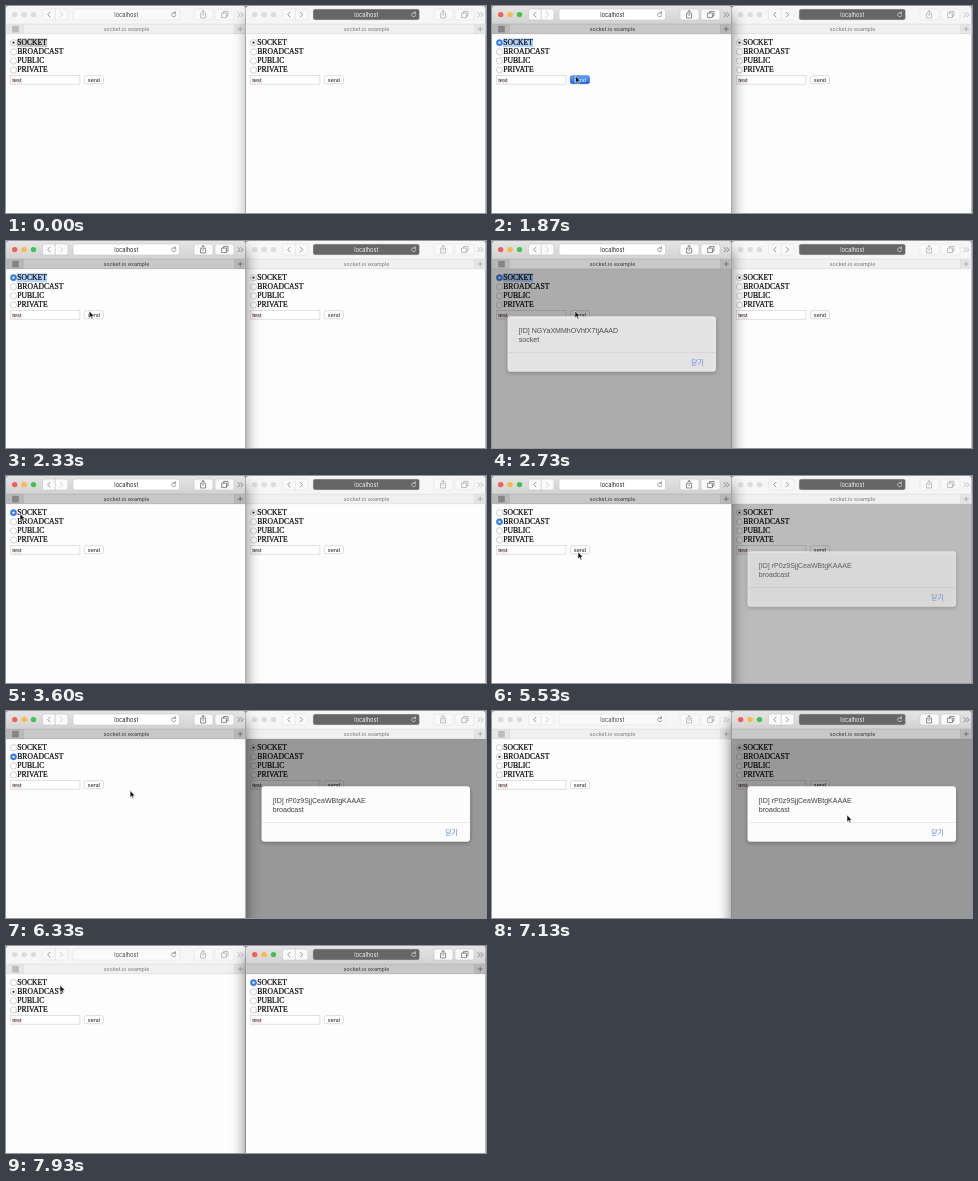
An HTML page for the animation above (8 s loop, 480 by 207 pixels).

```html
<!DOCTYPE html>
<html lang="en">
<head>
<meta charset="utf-8">
<title>socket.io example</title>
<style>
html, body { margin: 0; width: 100%; height: 100%; overflow: hidden; background: #fdfdfe; }
svg { display: block; width: 100%; height: 100%; }
text { white-space: pre; }
.ui { font-family: Inter, "Liberation Sans", sans-serif; }
.form { font-family: "Liberation Sans", Arial, sans-serif; }
.label { font: 7.65px "Liberation Serif", Times, serif; stroke: #000; stroke-width: .18; }
.korean { font: 6.8px "Noto Sans CJK KR", "Noto Sans CJK", sans-serif; fill: #4a7fe5; }
.line { fill: none; stroke-linecap: round; stroke-linejoin: round; stroke-width: .65; }
</style>
</head>
<body>
<svg id="stage" viewBox="0 0 480 207" preserveAspectRatio="none">
  <defs>
    <linearGradient id="bar" x2="0" y2="1">
      <stop stop-color="#e6e5e6"/><stop offset="1" stop-color="#d3d2d3"/>
    </linearGradient>
    <linearGradient id="press" x2="0" y2="1">
      <stop stop-color="#67a5f6"/><stop offset="1" stop-color="#1764e8"/>
    </linearGradient>
    <filter id="soft" x="-10%" y="-20%" width="120%" height="150%"><feGaussianBlur stdDeviation="2.2"/></filter>
    <filter id="wide" x="-12%" y="-12%" width="124%" height="124%"><feGaussianBlur stdDeviation="7.5"/></filter>
  </defs>
</svg>
<script>
const LOOP = 8000;
const OPTIONS = ["SOCKET", "BROADCAST", "PUBLIC", "PRIVATE"];
const LIGHTS = ["#f25f58", "#f5bb45", "#42c250"];
const stage = document.getElementById("stage");

// Cursor way points: time, x, y
const PATH = [
  [70, 345, 209], [870, 286, 172], [1000, 278, 160], [1450, 118, 92],
  [1720, 83.5, 70], [2800, 83, 70], [3180, 204, 120], [3330, 204, 120],
  [3580, 14, 37.5], [3720, 14, 37.5], [4050, 8.5, 44.5], [4450, 8.5, 44.5],
  [5050, 86, 76], [6200, 86, 76], [6750, 352, 101], [7000, 355, 104],
  [7140, 355, 104], [7400, 445, 120], [7530, 445, 120], [7870, 95, 52],
  [7930, 54, 39.3]
];

const clamp = v => Math.max(0, Math.min(1, v));
const ease = v => v * v * (3 - 2 * v);
const during = (t, a, b) => t >= a && t < b;
const fade = (t, a, b, c, d) => Math.min(clamp((t - a) / (b - a)), 1 - clamp((t - c) / (d - c)));

function rect(x, y, w, h, fill, extra = "") {
  return `<rect x="${x}" y="${y}" width="${w}" height="${h}" fill="${fill}" ${extra}/>`;
}

function label(x, y, size, str, extra = "") {
  return `<text x="${x}" y="${y}" font-size="${size}" ${extra}>${str}</text>`;
}

function toolbar(active, isPrivate) {
  const ink = active ? "#565656" : "#a0a0a0";
  const edge = active ? "#bebebe" : "#dedede";
  const button = active ? "#fafafa" : "#f9f9f9";
  const field = isPrivate ? "#666" : active ? "#fff" : "#fafafa";
  const fieldInk = isPrivate ? "#f4f4f4" : active ? "#222" : "#444";
  const box = (x, w, fill) => rect(x, 3, w, 11, fill, `rx="2" stroke="${edge}" stroke-width=".5"`);
  const lights = LIGHTS.map((c, i) =>
    `<circle cx="${8.7 + i * 9.4}" cy="8.6" r="2.7" fill="${active ? c : "#dcdcdc"}"/>`).join("");
  return `<path d="M0 18V3Q0 0 3 0H236.5Q239.5 0 239.5 3V18Z" fill="${active ? "url(#bar)" : "#f6f6f6"}"/>
    ${lights}${box(36.5, 25.5, button)}${box(67, 106.5, field)}${box(188, 19, button)}${box(209, 19, button)}
    <g class="line" stroke="${ink}">
      <path d="M49.2 3V14" stroke="${edge}"/>
      <path d="M44 6.2L41.7 8.6L44 11" stroke="#666"/>
      <path d="M54.3 6.2L56.6 8.6L54.3 11" stroke="${isPrivate ? "#666" : "#bbb"}"/>
      <path d="M195.7 7.4H194.6V12H199.6V7.4H198.5M197.1 9.6V4.6M195.5 6.1L197.1 4.5L198.7 6.1"/>
      <path d="M216 7H220.4V11.6H216ZM217.6 7V5.4H222V10H220.4"/>
      <path d="M232 6.6L234 8.7L232 10.8M235 6.6L237 8.7L235 10.8"/>
      <path d="M169.2 7.1A2.1 2.1 0 1 0 169.8 9M169.5 5.6V7.4H167.8" stroke="${isPrivate ? "#ddd" : "#777"}"/>
    </g>
    ${label(120.3, 10.7, 5.6, "localhost", `class="ui" text-anchor="middle" fill="${fieldInk}"`)}`;
}

function tabs(active, isPrivate) {
  const side = active ? "#b9b8b9" : "#e6e6e6";
  const edge = active ? "#a6a5a6" : "#d4d4d4";
  const pinned = isPrivate ? "" : rect(0, 18, 17, 10, side) +
    rect(6.2, 19.8, 6.6, 6.6, active ? "#858585" : "#bcbcbc") + rect(17, 18, .5, 10, edge);
  return rect(0, 18, 239.5, 10, active ? "#c9c8c9" : "#f0f0f0") + pinned +
    rect(228.5, 18, 11, 10, side) + rect(228.2, 18, .5, 10, edge) +
    rect(0, 17.8, 239.5, .5, edge) + rect(0, 27.6, 239.5, .5, edge) +
    label(120.5, 25, 5.35, "socket.io example", `class="ui" text-anchor="middle" fill="${active ? "#333" : "#777"}"`) +
    `<path class="line" d="M232 23H236.4M234.2 20.8V25.2" stroke="${active ? "#555" : "#999"}"/>`;
}

function radio(i, chosen, active) {
  const blue = chosen && active;
  const y = 36.7 + i * 9.1;
  const dot = chosen ? `<circle cx="7.5" cy="${y}" r="1.15" fill="${blue ? "#fff" : "#333"}"/>` : "";
  return `<circle cx="7.5" cy="${y}" r="3.1" fill="${blue ? "#3480f3" : "#fff"}" stroke="${blue ? "#2a6cd8" : "#a5a5a5"}" stroke-width=".5"/>${dot}` +
    label(11.2, y + 2.3, 7.65, OPTIONS[i], 'class="label"');
}

function page(w) {
  const mark = w.mark ? rect(11, 32.3, 30, 8.8, w.mark) : "";
  const down = w.pressed;
  return rect(0, 28, 239.5, 179, "#fdfdfe") + mark +
    OPTIONS.map((_, i) => radio(i, i === w.choice, w.radioOn)).join("") +
    rect(4.3, 69.4, 69.6, 8.8, "#fff", 'stroke="#cdcdcd" stroke-width=".6"') +
    label(6.2, 75.9, 5.9, "test", 'class="form" fill="#2b1414"') +
    '<path d="M6.2 77H16" stroke="#e0584f" stroke-width=".6" stroke-dasharray="1 .6" opacity=".6"/>' +
    rect(78.3, 69.7, 19.2, 8, down ? "url(#press)" : "#fff", `rx="1.8" stroke="${down ? "#1d62d0" : "#c8c8c8"}" stroke-width=".6"`) +
    label(87.9, 75.7, 5.6, "send", `class="form" text-anchor="middle" fill="${down ? "#fff" : "#222"}"`);
}

function dialog(p, id, message) {
  if (p <= 0) return "";
  return rect(0, 28, 239.5, 179, "#000", `opacity="${.4 * p}"`) +
    rect(15.5, 77, 208.5, 55, "#000", `rx="3" filter="url(#soft)" opacity="${.3 * p}"`) +
    `<g opacity="${p}">` + rect(15.5, 75.3, 208.5, 55.5, "#fcfcfd", 'rx="3"') +
    rect(15.5, 111, 208.5, .5, "#dadadc") +
    label(26.8, 91.8, 7.05, `[ID] ${id}`, 'class="form" fill="#404040"') +
    label(26.8, 101, 7.05, message, 'class="form" fill="#404040"') +
    label(205.5, 123.5, 6.8, "닫기", 'class="korean" text-anchor="middle"') + "</g>";
}

function browser(w) {
  const shadow = rect(0, 9, 239.5, 230, "#000", `filter="url(#wide)" opacity="${w.active ? .55 : .3}"`);
  return `<g transform="translate(${w.x})">${shadow}${page(w)}${toolbar(w.active, w.isPrivate)}${tabs(w.active, w.isPrivate)}${dialog(w.sheet, w.id, w.message)}</g>`;
}

function cursor(t) {
  if (t < PATH[0][0]) return "";
  let i = 0;
  while (i < PATH.length - 2 && t >= PATH[i + 1][0]) i++;
  const [t0, x0, y0] = PATH[i], [t1, x1, y1] = PATH[i + 1];
  const k = ease(clamp((t - t0) / (t1 - t0)));
  return `<path transform="translate(${x0 + (x1 - x0) * k} ${y0 + (y1 - y0) * k})" d="M0 0V7L1.6 5.5L2.6 8L3.8 7.5L2.8 5.1H5Z" fill="#111" stroke="#fff" stroke-width=".55"/>`;
}

function draw(t) {
  const leftOn = during(t, 1400, 6700);
  const rightOn = t >= 6700;
  const left = {
    x: 0, active: leftOn, radioOn: leftOn, choice: t < 4260 ? 0 : 1,
    mark: t >= 3550 ? "" : leftOn ? "#b3d2fb" : "#c9c9c9",
    pressed: during(t, 1800, 2000) || during(t, 5270, 5390),
    sheet: fade(t, 2570, 2770, 3290, 3470),
    id: "NGYaXMMhOVhfX7tjAAAD", message: "socket"
  };
  const right = {
    x: 240, active: rightOn, radioOn: t >= 7600, choice: 0, isPrivate: true,
    sheet: fade(t, 5400, 5600, 7470, 7640),
    id: "rP0z9SjjCeaWBtgKAAAE", message: "broadcast"
  };
  const [back, front] = leftOn ? [right, left] : [left, right];
  scene.innerHTML = rect(0, 0, 480, 207, "#999") + browser(back) + browser(front) + cursor(t);
}

const scene = document.createElementNS("http://www.w3.org/2000/svg", "g");
stage.append(scene);

function tick() {
  draw(performance.now() % LOOP);
  requestAnimationFrame(tick);
}
tick();
</script>
</body>
</html>
```
